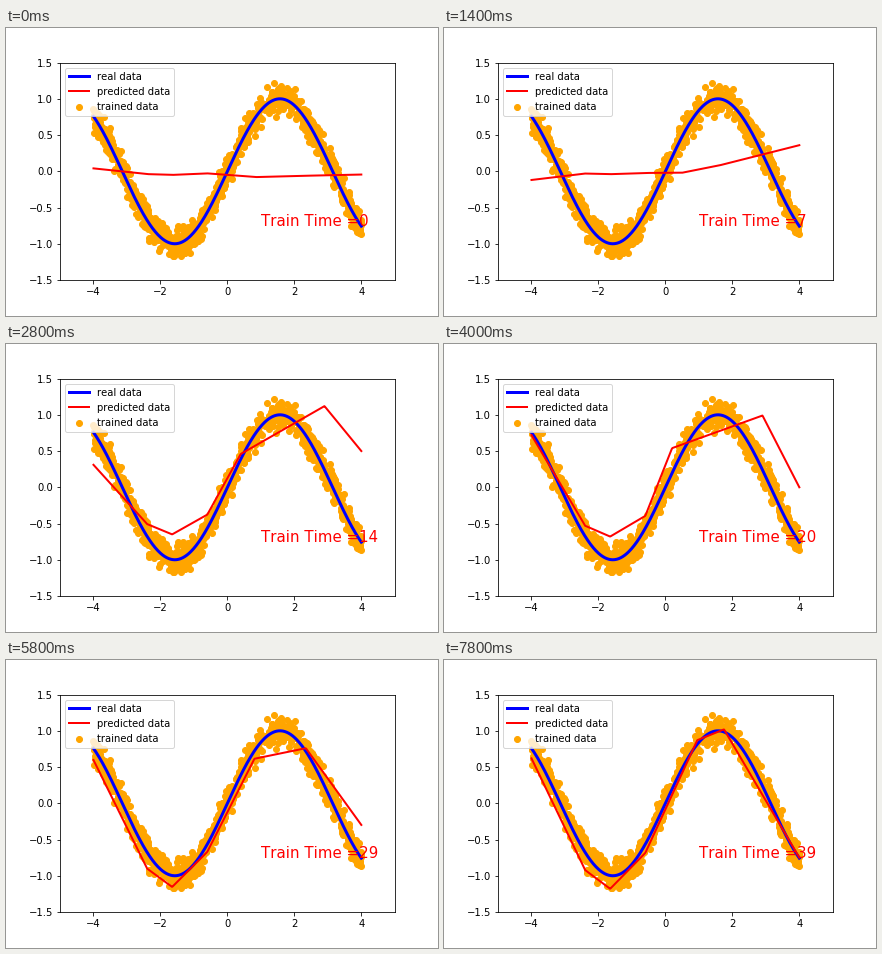
Recreate the animation shown at these times as a matplotlib script. Size 432 by 288 pixels, loop 8 s.

```python
import numpy as np
import matplotlib.pyplot as plt
from matplotlib.animation import FuncAnimation

# Loose kerning widens "Train" and the legend labels slightly.
plt.rcParams["text.kerning_factor"] = 6

STEPS = 40
x = np.linspace(-4, 4, 400)

# Pose of the fitted curve by training step:
# start y, dip y, shoulder x, shoulder y, peak x, peak y, end y
POSES = {
    0: (.04, -.05, .85, -.08, 2, -.065, -.045),
    7: (-.12, -.04, .5, -.02, 1.6, .08, .36),
    14: (.31, -.65, .4, .46, 2.9, 1.12, .5),
    20: (.72, -.68, .2, .54, 2.9, .99, 0),
    26: (.73, -1.33, .85, .58, 2.6, .7, -.29),
    33: (.42, -.92, .75, .66, 2, .84, -.31),
    39: (.62, -1.18, .95, .87, 1.75, 1.02, -.75),
}


def pose_at(step):
    if 7 < step < 14:
        # slow start before the curve first bends
        step = 7 + (step - 7) ** 2 / 7
    return [np.interp(step, list(POSES), col) for col in zip(*POSES.values())]


def predict(step):
    start, dip, sx, sy, px, py, end = pose_at(step)
    if 14 < step < 20:
        # the trough drops too far, then recovers
        dip -= .9 * np.sin(np.pi * (step - 14) / 6)
    y = np.interp(x, [-4, -2.4, -1.65, -.6, sx, px, 4],
                  [start, .78 * dip, dip, .58 * dip, sy, py, end])
    # early overshoot of the slope, fading out
    kick = np.exp(-.6 * step) * np.sin(2 * np.pi * step / 7)
    return y + kick * x


def noisy_samples(n=1000, spread=.1):
    rng = np.random.default_rng(5)
    sx = rng.uniform(-4, 4, n)
    noise = rng.normal(0, spread, n).clip(-2.4 * spread, 2.4 * spread)
    return sx, np.sin(sx) + noise


fig, ax = plt.subplots(figsize=(6, 4), dpi=72)
fig.subplots_adjust(left=.125, right=.9, bottom=.125, top=.88)
ax.set(xlim=(-5, 5), ylim=(-1.5, 1.5))

dots = ax.scatter(*noisy_samples(), color="orange", label="trained data")
real, = ax.plot(x, np.sin(x), color="blue", lw=3, label="real data")
pred, = ax.plot(x, predict(0), color="red", lw=2, label="predicted data")
label = ax.text(1, -.75, "", fontsize=15, color="red")
ax.legend(handles=[real, pred, dots], loc="upper left")


def update(step):
    pred.set_ydata(predict(step))
    label.set_text(f"Train Time ={step}")
    return pred, label


anim = FuncAnimation(fig, update, frames=STEPS, interval=200, repeat=True,
                     repeat_delay=0)
plt.show()
```
